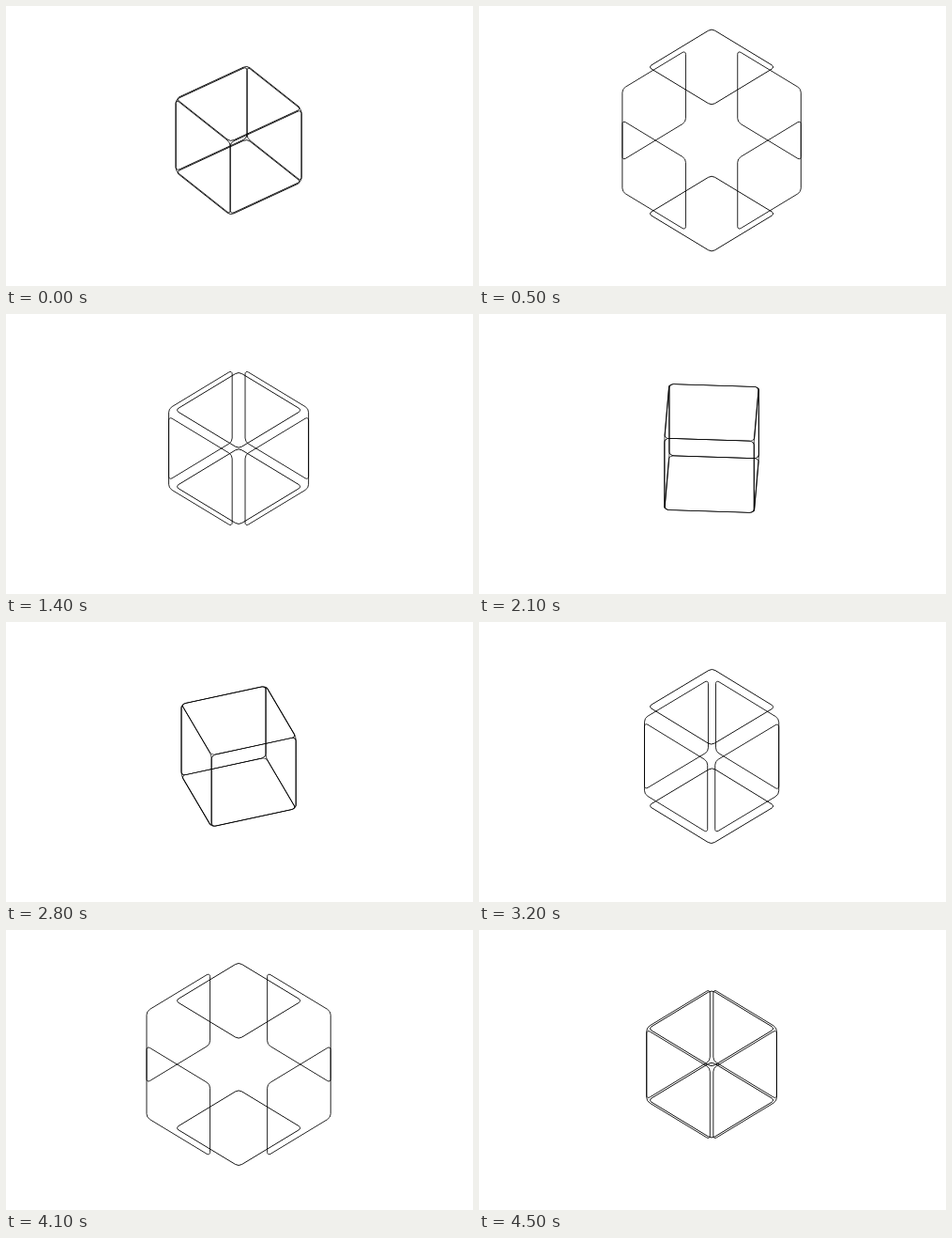
An HTML page with a canvas for the animation above (4.6 s loop, 498x298 px).

```html
<!DOCTYPE html>
<html lang="en">
<head>
<meta charset="utf-8">
<title>Unfolding cube</title>
<style>
  html, body { margin: 0; width: 100%; height: 100%; overflow: hidden; background: #fff; }
  canvas { display: block; }
</style>
</head>
<body>
<canvas id="stage" width="498" height="298"></canvas>
<script>
const ctx = document.getElementById('stage').getContext('2d');
const LOOP = 4600, CYCLE = 3000, STEP = 100;
const CX = 248.1, CY = 143;
const SIDE = 95.6, RADIUS = 5;
const TILT = 37.2 * Math.PI / 180;
const COS = Math.cos(TILT), SIN = Math.sin(TILT);

// cubic-bezier(.42, 0, .58, 1)
function ease(x) {
  if (x <= 0) return 0;
  if (x >= 1) return 1;
  let lo = 0, hi = 1;
  for (let i = 0; i < 30; i++) {
    const m = (lo + hi) / 2, n = 1 - m;
    const bx = 3 * n * n * m * 0.42 + 3 * n * m * m * 0.58 + m * m * m;
    if (bx < x) lo = m; else hi = m;
  }
  return lo * lo * (3 - 2 * lo);
}

const ramp = (t, from, span) => ease((t - from) / span);
const spread = (t, out, back) => ramp(t, out, 660) - ramp(t, back, 660);

const project = ([x, y, z]) => [x, z * SIN - y * COS];

// The stroke lies in the plane of the face, so it is foreshortened too.
function face(normal, u, v, offset) {
  const d = SIDE / 2 + offset;
  const [nx, ny] = project(normal), [ux, uy] = project(u), [vx, vy] = project(v);
  ctx.setTransform(ux, uy, vx, vy, CX + nx * d, CY + ny * d);
  ctx.beginPath();
  ctx.roundRect(-SIDE / 2, -SIDE / 2, SIDE, SIDE, RADIUS);
  ctx.stroke();
  ctx.resetTransform();
}

function draw(t) {
  const q = (t + 100) % CYCLE - 100;
  const lid = 52 * spread(q, -73, 856);
  const wall = 48.7 * spread(q, 43, 945);
  const turn = ramp(q < 1000 ? q + CYCLE : q, 1522, 1729);
  const spin = Math.PI * (1 - turn) + Math.PI / 4;
  const dir = a => [Math.sin(a), 0, -Math.cos(a)];
  const up = [0, 1, 0], down = [0, -1, 0];

  ctx.fillStyle = '#fff';
  ctx.fillRect(0, 0, 498, 298);
  ctx.strokeStyle = '#000';
  ctx.lineWidth = 1;

  for (let i = 0; i < 4; i++) {
    const a = spin + i * Math.PI / 2;
    face(dir(a), dir(a + Math.PI / 2), up, wall);
  }
  for (const n of [up, down]) face(n, dir(spin), dir(spin + Math.PI / 2), lid);
}

const start = performance.now();
function tick() {
  const t = (performance.now() - start) % LOOP;
  draw(Math.floor(t / STEP) * STEP);
  requestAnimationFrame(tick);
}
tick();
</script>
</body>
</html>
```
